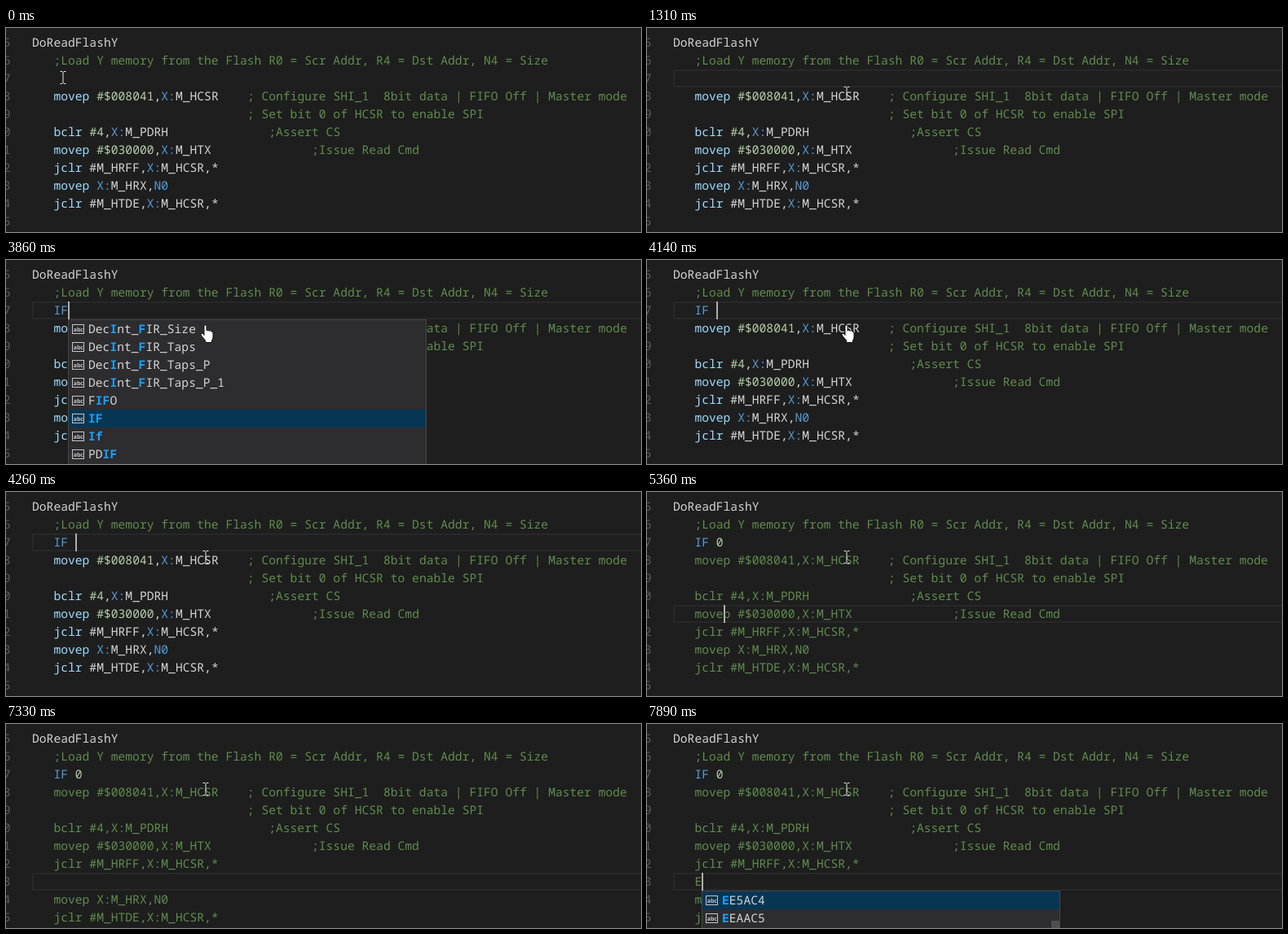
An HTML page that plays this animation: 779x251 px, repeating every 8000 ms.

```html
<!DOCTYPE html>
<html lang="en">
<head>
<meta charset="utf-8">
<title>Assembly editor</title>
<style>
  html, body { margin: 0; width: 100%; height: 100%; overflow: hidden; background: #1e1e1e; }
  svg { display: block; width: 779px; height: 251px; }
  text {
    font: 14.66px "Noto Sans Mono", "DejaVu Sans Mono", monospace;
    white-space: pre; text-rendering: geometricPrecision; fill: #d4d4d4;
  }
  .num { fill: #5a5a5a; }
  .op { fill: #9cdcfe; }
  .key { fill: #569cd6; }
  .lit { fill: #b5cea8; }
  .com { fill: #608b4e; }
  .hit { fill: #18a3ff; font-weight: 700; }
  .abc { font: 700 7px "Noto Sans", sans-serif; fill: #c5c5c5; }
</style>
</head>
<body>
<svg id="stage" viewBox="0 0 779 251"></svg>
<script>
const LOOP = 8000, CELL = 8.8, LINE = 22, LEFT = 32, TOP = 7;
const stage = document.getElementById('stage');
const colX = c => LEFT + c * CELL;
const rowY = r => TOP + r * LINE;
const at = (col, left, note) => left.padEnd(col) + note;

const base = [
  'DoReadFlashY',
  '   ;Load Y memory from the Flash R0 = Scr Addr, R4 = Dst Addr, N4 = Size',
  '',
  at(30, '   movep #$008041,X:M_HCSR', '; Configure SHI_1  8bit data | FIFO Off | Master mode'),
  at(30, '', '; Set bit 0 of HCSR to enable SPI'),
  at(33, '   bclr #4,X:M_PDRH', ';Assert CS'),
  at(39, '   movep #$030000,X:M_HTX', ';Issue Read Cmd'),
  '   jclr #M_HRFF,X:M_HCSR,*',
  '   movep X:M_HRX,N0',
  '   jclr #M_HTDE,X:M_HCSR,*'
];

// Brackets mark the matched letters.
const firList = {
  col: 5, row: 3, pick: 5,
  items: ['Dec[I]nt_[F]IR_Size', 'Dec[I]nt_[F]IR_Taps', 'Dec[I]nt_[F]IR_Taps_P',
    'Dec[I]nt_[F]IR_Taps_P_1', 'F[IF]O', '[IF]', '[If]', 'PD[IF]']
};
const hexList = { col: 4, row: 9, pick: 0, thumb: true, items: ['[E]E5AC4', '[E]EAAC5'] };

// Each step keeps the earlier values that it does not change.
const steps = [
  [0, { caret: null, on: false, mouse: [70, 61], hand: false, typed: '', off: false, extra: null, list: null, words: false }],
  [800, { caret: [2, 0], on: true }],
  [920, { mouse: [115, 66] }],
  [1040, { mouse: [197, 75] }],
  [1160, { mouse: [245, 80] }],
  [1310, { on: false }],
  [1870, { on: true }],
  [2300, { on: false }],
  [2420, { caret: [2, 3], on: true }],
  [2850, { on: false }],
  [3440, { on: true }],
  [3860, { typed: 'IF', caret: [2, 5], list: firList, hand: true }],
  [4140, { typed: 'IF ', caret: [2, 6], list: null }],
  [4260, { hand: false }],
  [4380, { typed: 'IF 0', caret: [2, 7], off: true }],
  [4980, { caret: [3, 7] }],
  [5120, { caret: [4, 6] }],
  [5240, { caret: [5, 7] }],
  [5360, { caret: [6, 7] }],
  [5510, { caret: [7, 7] }],
  [5790, { words: true }],
  [6070, { on: false }],
  [6470, { caret: [7, 26], on: true, words: false }],
  [6900, { caret: [8, 3], extra: '   ' }],
  [7330, { on: false }],
  [7890, { caret: [8, 4], on: true, extra: '   E', list: hexList }]
];

const esc = s => s.replace(/&/g, '&amp;').replace(/</g, '&lt;');
const span = (cls, s) => `<tspan class="${cls}">${esc(s)}</tspan>`;
const text = (x, y, body, cls = '') => `<text class="${cls}" x="${x}" y="${y}">${body}</text>`;
const rect = (x, y, w, h, fill, more = '') =>
  `<rect x="${x}" y="${y}" width="${w}" height="${h}" fill="${fill}" ${more}/>`;

function paint(line, off) {
  if (off) return span('com', line);
  const rule = /(;.*)|(\b(?:movep|bclr|jclr)\b)|(X:|\bN0\b|\bIF\b)|(#\$?\d+|\b\d+\b)|([^;]?)/g;
  return line.replace(rule, (all, com, op, key, lit) =>
    com ? span('com', com) : op ? span('op', op) : key ? span('key', key) : lit ? span('lit', lit) : esc(all));
}

function codeLines(s) {
  const lines = base.slice();
  lines[2] = s.typed && '   ' + s.typed;
  if (s.extra !== null) lines.splice(8, 0, s.extra);
  return lines.map((l, r) => text(LEFT, rowY(r) + 16, paint(l, s.off && r > 2))).join('');
}

function gutter() {
  let out = '';
  for (let r = 0; r < 11; r++) out += text(-3.2, rowY(r) + 16, (r + 5) % 10, 'num');
  return out;
}

function popup(p) {
  const x = Math.round(colX(p.col)), y = rowY(p.row);
  let out = rect(x + .5, y + .5, 439, 300, '#2d2d30', 'stroke="#454545"');
  p.items.forEach((item, i) => {
    const top = y + 1 + i * LINE;
    if (i === p.pick) out += rect(x + 1, top, 438, LINE, '#073655');
    out += rect(x + 5.5, top + 5.5, 14, 11, 'none', 'stroke="#c5c5c5"');
    out += text(x + 6.7, top + 13.5, 'abc', 'abc');
    out += text(x + 25, top + 16, item.replace(/\[(\w+)\]/g, (m, hit) => span('hit', hit)));
  });
  if (p.thumb) out += rect(x + 429, y + 37, 10, 20, '#4f4f50');
  return out;
}

function pointer([x, y], hand) {
  if (!hand) {
    return `<path transform="translate(${x} ${y})" fill="none" stroke="#e6e6e6"
      d="M-3.5-7.5h2.5l1 1 1-1h2.5M0-6.5v13M-3.5 7.5h2.5l1-1 1 1h2.5"/>`;
  }
  return `<path transform="translate(${x} ${y})" fill="#fff" stroke="#111" stroke-linejoin="round"
    d="M-2 1.5Q-2 0-.5 0T1 1.5V7Q2.5 5.5 4 7.2 5.5 6 6.8 8 9 7.5 9 10v5q0 2-1.5 4v2.500h-8V19L-5 13.500q-2-3 0-3.500 1.500 0 3 2.500z"/>`;
}

function draw(s) {
  let out = '';
  if (s.caret) {
    out += rect(LEFT + 1, rowY(s.caret[0]) + 1, 760, LINE - 2, 'none', 'stroke="#282828" stroke-width="2"');
  }
  if (s.words) {
    for (const r of [7, 9]) out += rect(colX(3), rowY(r), 4 * CELL, LINE, '#575757', 'opacity=".72"');
  }
  out += gutter() + codeLines(s);
  if (s.on) out += rect(Math.round(colX(s.caret[1])), rowY(s.caret[0]), 2, LINE, '#aeafad');
  if (s.list) out += popup(s.list);
  stage.innerHTML = out + pointer(s.mouse, s.hand);
}

let shown = -1;
function tick(now) {
  const t = now % LOOP;
  const count = steps.filter(([start]) => start <= t).length;
  if (count !== shown) {
    shown = count;
    draw(Object.assign({}, ...steps.slice(0, count).map(step => step[1])));
  }
  requestAnimationFrame(tick);
}
tick(0);
</script>
</body>
</html>
```
